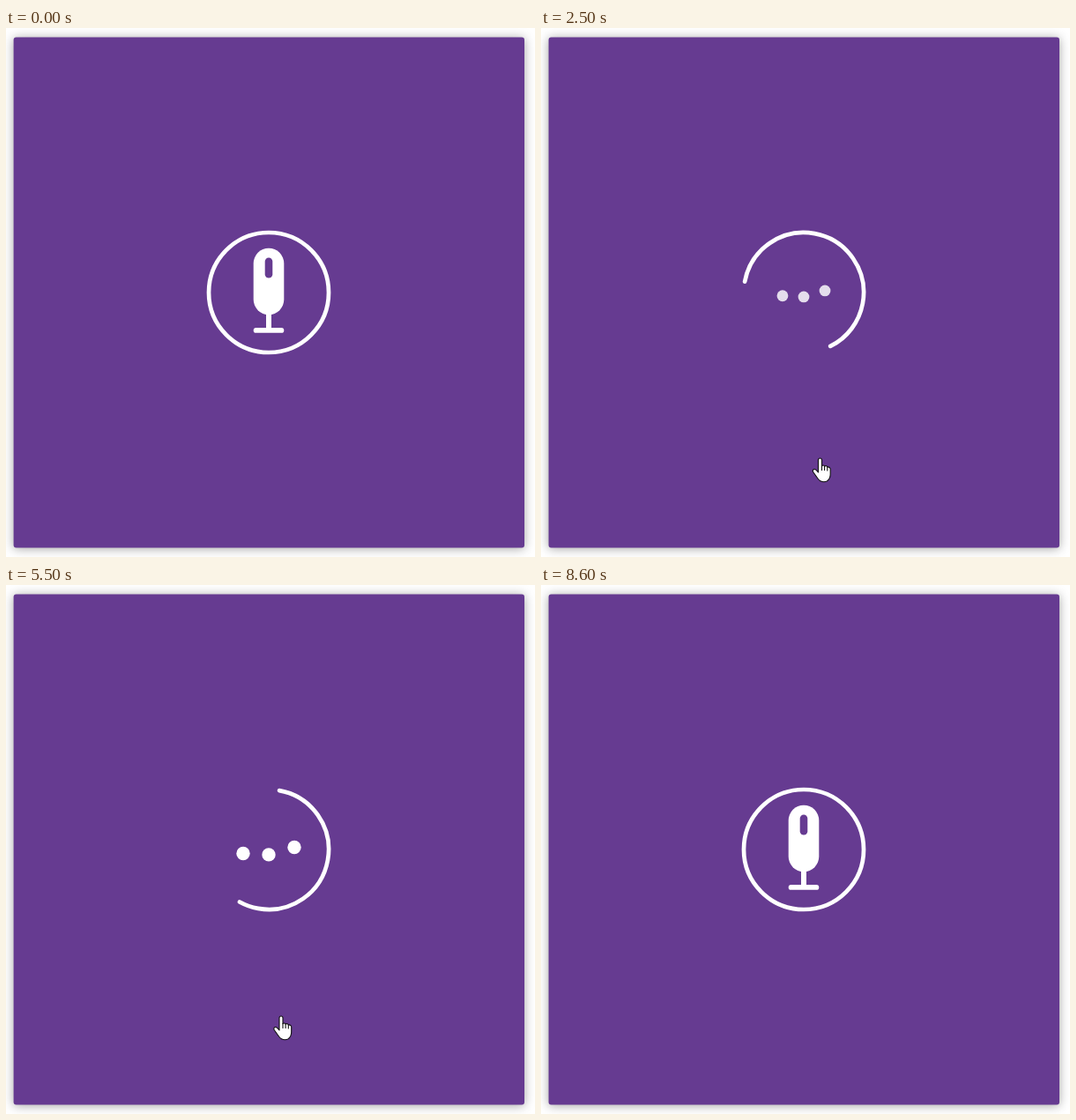
These frames come from a looping animation (600 by 600 pixels, 9.7 s). An HTML page:

```html
<!DOCTYPE html>
<html lang="en">
<head>
<meta charset="utf-8">
<title>Microphone button</title>
<style>
  html, body {
    margin: 0;
    width: 100%;
    height: 100%;
    overflow: hidden;
    background: #fff;
  }
  svg {
    position: absolute;
    left: 0;
    top: 0;
    width: 600px;
    height: 600px;
  }
  .card {
    fill: #663b91;
    filter: drop-shadow(0 1px 6px rgba(0, 0, 0, .36));
  }
</style>
</head>
<body>
<svg viewBox="0 0 600 600">
  <rect class="card" x="8.6" y="10.6" width="579.4" height="578.9" rx="3"/>
  <g transform="translate(298 300)" fill="#fff">
    <circle id="ring" r="68" pathLength="360" fill="none" stroke="#fff"
            stroke-width="4.7" stroke-linecap="round"/>
    <g id="mic">
      <rect x="-3" y="20" width="6" height="23"/>
      <rect x="-17.3" y="40" width="34.6" height="5.8" rx="2.9"/>
      <rect x="-17.3" y="-50.2" width="34.6" height="75.4" rx="17.3"/>
      <rect x="-4.3" y="-39.5" width="8.6" height="23" rx="4.3" fill="#663b91"/>
    </g>
    <g id="dots">
      <circle cx="-29" r="7.7"/>
      <circle r="7.7"/>
      <circle cx="29" r="7.7"/>
    </g>
  </g>
  <g id="hand" stroke="#111" stroke-width="1.1" stroke-linejoin="round" stroke-linecap="round">
    <path fill="#fff" d="M-1.5 2Q-1.5 0 .5 0Q2.5 0 2.5 2V8.6Q4.6 7.2 5.6 9Q8 8 8.8 10Q11.6 9.4 12.2 12V18
      Q12.2 21.5 10.4 24Q8.6 26.8 5 26.8Q.4 26.8-2.2 22.8L-7.2 15.8Q-8.4 13.6-6.6 12.6Q-5 12-3.6 13.6L-1.5 16Z"/>
    <path fill="none" d="M2.5 8.6V13.5M5.6 9V13.5M8.8 10V14"/>
  </g>
</svg>
<script>
  const LOOP = 9700, STEP = 100;
  const START = 1619, STOP = 7400, LEAVE = 7800;

  // Pointer stops: time, x, y of the fingertip
  const STOPS = [
    [600, 109, 181], [1500, 301, 308], [1800, 301, 308], [2500, 316, 488],
    [3600, 315, 493], [5500, 311.5, 489], [6800, 309, 487], [7300, 271, 318]
  ];

  const el = id => document.getElementById(id);
  const ring = el('ring'), mic = el('mic'), dots = el('dots'), hand = el('hand');

  const progress = (t, from, length) => Math.min(1, Math.max(0, (t - from) / length));
  const backIn = p => p * p * (2.7 * p - 1.7);
  const quadOut = p => p * (2 - p);
  const smooth = p => p * p * (3 - 2 * p);
  const mix = (a, b, p) => a + (b - a) * p;

  function drawRing(t) {
    let start = 0, length = 360;
    if (t >= START && t < STOP) {
      const age = t - START;
      const phase = age * 0.144 % 720;
      const turn = age * 0.2162;
      // The arc shrinks from its tail, then grows back on the other side
      length = Math.abs(360 - phase);
      start = phase < 360 ? turn : turn - length;
    }
    ring.setAttribute('stroke-dasharray', length < 360 ? `${length} 360` : 'none');
    ring.setAttribute('transform', `rotate(${start % 360})`);
  }

  function drawMic(t) {
    const hidden = progress(t, START, 500) - progress(t, STOP + 150, 400);
    mic.setAttribute('transform', `scale(${1 - backIn(hidden)})`);
  }

  function drawDots(t) {
    const shown = quadOut(progress(t, START + 500, 650) - progress(t, STOP - 50, 250));
    dots.setAttribute('transform', `scale(${shown})`);
    dots.setAttribute('opacity', shown);
    [...dots.children].forEach((dot, i) => {
      const angle = (41 + 80 * i + 360 * (t - 2500) / 1000) * Math.PI / 180;
      dot.setAttribute('cy', 6.9 * Math.sin(angle));
    });
  }

  function drawHand(t) {
    const visible = t >= STOPS[0][0] && t < LEAVE;
    hand.setAttribute('visibility', visible ? 'visible' : 'hidden');
    const next = STOPS.findIndex(stop => stop[0] > t);
    const b = STOPS.at(next), a = next > 0 ? STOPS[next - 1] : b;
    const p = smooth(progress(t, a[0], b[0] - a[0] || 1));
    hand.setAttribute('transform', `translate(${mix(a[1], b[1], p)} ${mix(a[2], b[2], p)})`);
  }

  const begin = performance.now();

  function frame() {
    const elapsed = (performance.now() - begin) % LOOP;
    const t = Math.floor(elapsed / STEP) * STEP;
    for (const draw of [drawRing, drawMic, drawDots, drawHand]) draw(t);
    requestAnimationFrame(frame);
  }
  frame();
</script>
</body>
</html>
```
